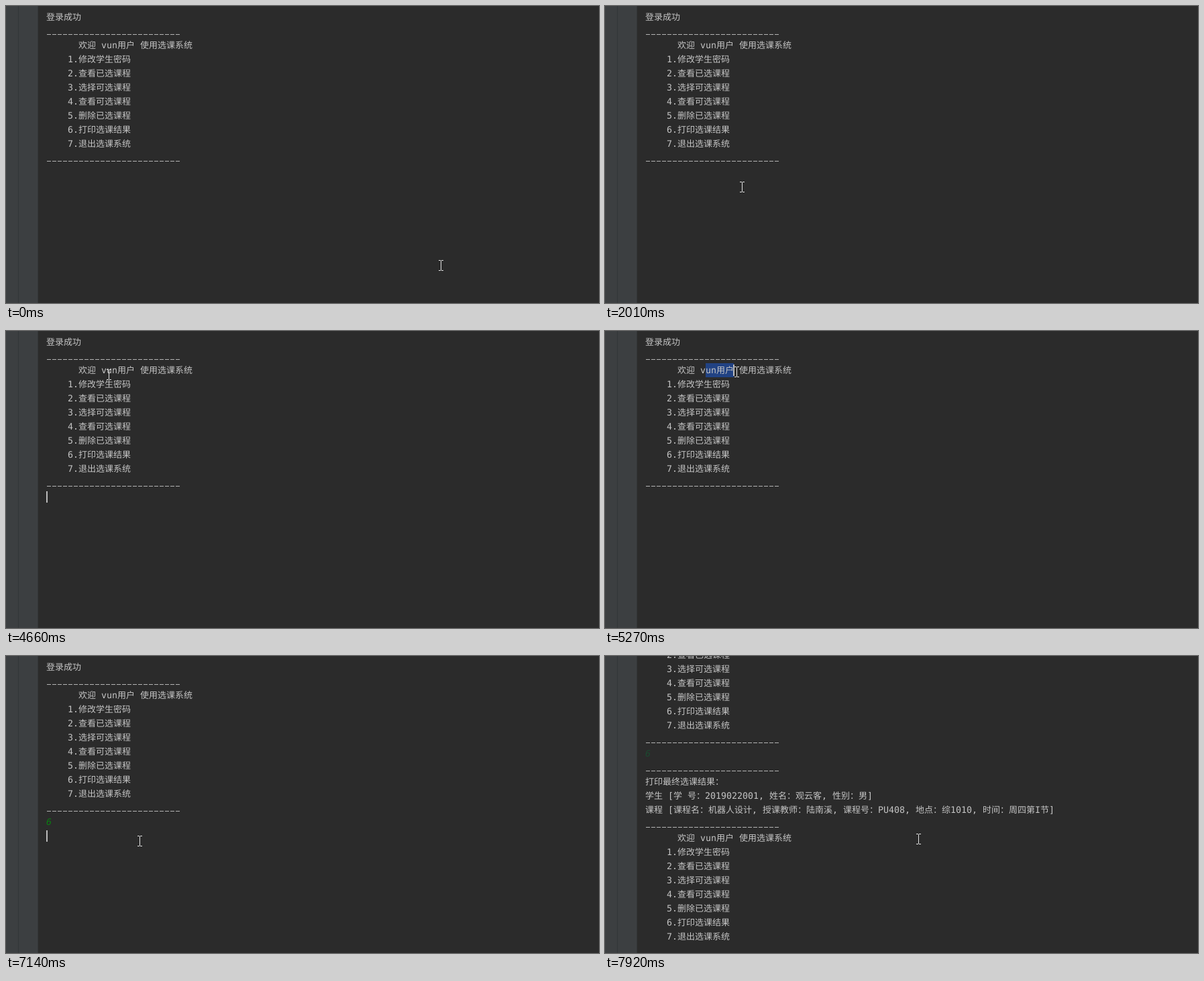
An HTML page that plays this animation: 884x443 px, repeating every 8 s.

```html
<!DOCTYPE html>
<html lang="zh-CN">
<head>
<meta charset="utf-8">
<title>选课系统</title>
<style>
  html, body { margin: 0; width: 100%; height: 100%; overflow: hidden; background: #2b2b2b; }
  svg { display: block; width: 100%; height: 100%; }
  text { white-space: pre; text-rendering: geometricPrecision; fill: #c4c4c4; }
  .cjk { font: 13px "Noto Sans CJK SC", "Noto Sans CJK", "Noto Sans CJK JP", sans-serif; }
  .mono { font: 13.29px "DejaVu Sans Mono", "Noto Sans Mono", monospace; }
  #typed { fill: #0b7d12; font-style: italic; }
  #typed.dim { fill: #1c4a30; }
  .rule { stroke: #b4b4b4; stroke-width: 1; stroke-dasharray: 6 2; }
</style>
</head>
<body>
<svg viewBox="0 0 884 443" xmlns="http://www.w3.org/2000/svg">
  <rect width="884" height="443" fill="#2b2b2b"/>
  <rect width="48" height="443" fill="#3c3f41"/>
  <rect x="18" width="1" height="443" fill="#323638"/>
  <rect x="47" width="1" height="443" fill="#343739"/>
  <rect id="selection" x="150" y="48" width="42" height="21" fill="#214283"/>
  <g id="console">
    <g id="menu"></g>
    <text id="typed" class="mono" x="60" y="252">6</text>
    <g id="result"></g>
  </g>
  <rect id="caret" width="2" height="17" fill="#bbb"/>
  <path id="mouse" fill="#e4e4e4" shape-rendering="crispEdges"
    d="M-3-8h3v1h-3zM1-8h3v1h-3zM0-7h1v14h-1zM-3 7h3v1h-3zM1 7h3v1h-3z"/>
</svg>
<script>
const LOOP = 8000, LEFT = 60, ROW = 21, TOP = 16, SCROLL = 102;
const SELECT = 4970, CLICK = 5980, TYPED = 6980, ENTER = 7140, OUTPUT = 7370;
const $ = id => document.getElementById(id);

const RULE = '-';
const MENU = [
  RULE, '      欢迎 vun用户 使用选课系统',
  ...['修改学生密码', '查看已选课程', '选择可选课程', '查看可选课程',
    '删除已选课程', '打印选课结果', '退出选课系统'].map((s, i) => `    ${i + 1}.${s}`),
  RULE
];
const RESULT = [
  RULE, '打印最终选课结果：',
  '学生 [学 号：2019022001, 姓名：观云客, 性别：男]',
  '课程 [课程名：机器人设计, 授课教师：陆南溪, 课程号：PU408, 地点：综1010, 时间：周四第I节]',
  ...MENU
];

function add(parent, tag, attrs, text) {
  const el = document.createElementNS('http://www.w3.org/2000/svg', tag);
  for (const k in attrs) el.setAttribute(k, attrs[k]);
  if (text) el.textContent = text;
  parent.append(el);
}

// ASCII cells are 8px wide, CJK cells 13px.
function addLine(parent, line, row) {
  const mid = TOP + row * ROW;
  if (line === RULE) {
    add(parent, 'line', { class: 'rule', x1: LEFT + 1, x2: LEFT + 199, y1: mid + 5.5, y2: mid + 5.5 });
    return;
  }
  let x = LEFT;
  for (const run of line.match(/[ -~]+|[^ -~]+/g)) {
    const ascii = run[0] <= '~';
    if (run.trim()) add(parent, 'text', { class: ascii ? 'mono' : 'cjk', x, y: mid + 5 }, run);
    x += run.length * (ascii ? 8 : 13);
  }
}

['登录成功', ...MENU].forEach((s, i) => addLine($('menu'), s, i));
RESULT.forEach((s, i) => addLine($('result'), s, i + 12));

// Each mouse move is a Bézier curve from the last position, taken in steps of about STEP ms.
const STEP = 78, HOME = [648, 387];
const MOVES = [
  { start: 70, end: 840, path: [[430, 260], [180, 190], [204, 270]] },
  { start: 4099, end: 4730, path: [[240, 200], [186, 80], [136, 52]] },
  { start: 4890, end: SELECT, path: [[150, 60], [180, 66], [197, 60]] },
  { start: 5278, end: CLICK, path: [[187, 30], [250, 355], [199, 276]] },
  { start: 7760, end: 7920, path: [[290, 276], [400, 274], [467, 273]] }
];

const bezier = (a, b, c, d, u) => {
  const v = 1 - u;
  return v * v * v * a + 3 * v * v * u * b + 3 * v * u * u * c + u * u * u * d;
};

function mouseAt(t) {
  let pos = HOME;
  for (const { start, end, path: [b, c, d] } of MOVES) {
    const gaps = Math.round((end - start) / STEP);
    const k = Math.floor((t - start + 10) * gaps / (end - start));
    if (k < 0) break;
    const u = Math.min(1, (k + 1) / (gaps + 1));
    pos = pos.map((a, i) => Math.round(bezier(a, b[i], c[i], d[i], u)));
  }
  return pos;
}

// The caret blinks while idle and stays lit for a while after each action.
function caretAt(t) {
  const row = n => TOP + n * ROW - 8;
  if (t < SELECT) return { x: LEFT, y: row(11), lit: t >= 530 && (t - 530) % 1010 < 460 };
  const recent = since => t - since < 620;
  if (t < CLICK) return { x: 191, y: row(2), lit: recent(SELECT) };
  if (t < TYPED) return { x: LEFT, y: row(11), lit: recent(CLICK) };
  if (t < ENTER) return { x: LEFT + 8, y: row(11), lit: true };
  return { x: LEFT, y: row(12), lit: t < OUTPUT };
}

const show = (el, on) => el.setAttribute('visibility', on ? 'visible' : 'hidden');

function draw(t) {
  const done = t >= OUTPUT;
  $('console').setAttribute('transform', `translate(0 ${done ? -SCROLL : 0})`);
  show($('result'), done);
  show($('typed'), t >= TYPED);
  $('typed').classList.toggle('dim', done);
  show($('selection'), t >= SELECT && t < CLICK);

  const { x, y, lit } = caretAt(t);
  show($('caret'), lit);
  $('caret').setAttribute('x', x);
  $('caret').setAttribute('y', y);
  $('mouse').setAttribute('transform', `translate(${mouseAt(t)})`);
}

const begin = performance.now();
function tick() {
  draw((performance.now() - begin) % LOOP);
  requestAnimationFrame(tick);
}
tick();
</script>
</body>
</html>
```
